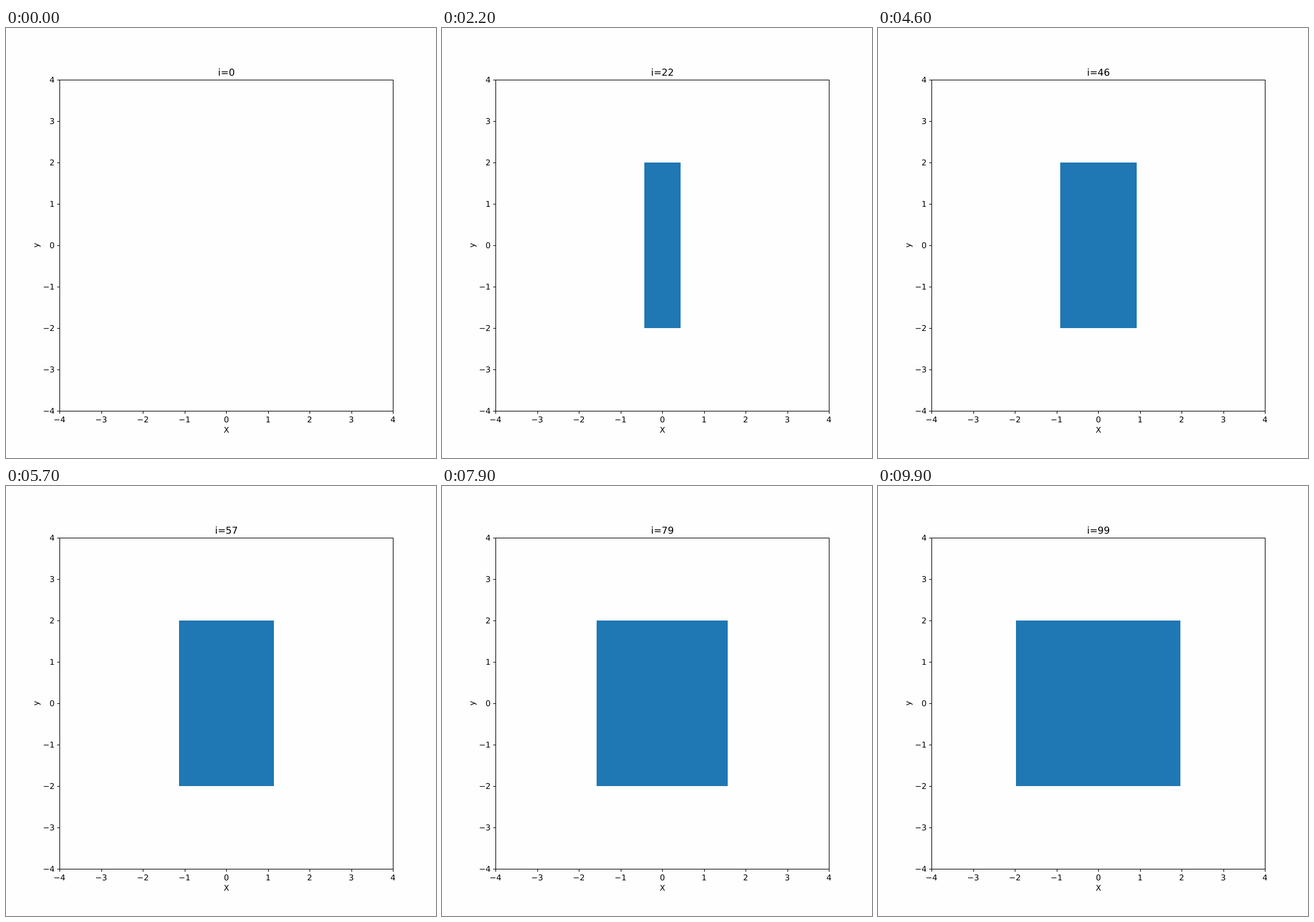
These frames come from a looping animation (748x748 px, 10 s). An HTML page:

```html
<!DOCTYPE html>
<html lang="en">
<head>
<meta charset="utf-8">
<title>Growing rectangle</title>
<style>
  html, body { margin: 0; width: 100%; height: 100%; overflow: hidden; background: #fefefe; }
  svg { display: block; width: 748px; height: 748px; }
  text { font: 13.889px "DejaVu Sans", sans-serif; text-anchor: middle; text-rendering: geometricPrecision; }
  #title { font-size: 16.667px; }
  .end { text-anchor: end; }
  .line { fill: none; stroke: #000; stroke-width: 1.11; }
</style>
</head>
<body>
<svg id="plot" viewBox="0 0 748 748">
  <rect id="bar" y="234" height="288" fill="#1f77b4"/>
  <rect class="line" x="93.5" y="90.5" width="580" height="576"/>
  <text id="title" x="383.4" y="83"></text>
  <text x="383.6" y="704">X</text>
  <text transform="translate(57 378) rotate(-90)">y</text>
</svg>
<script>
const FRAME_MS = 100;
const FRAME_COUNT = 100;
const plot = document.getElementById('plot');
const bar = document.getElementById('bar');
const title = document.getElementById('title');

function add(name, attrs, text = '') {
  const node = document.createElementNS('http://www.w3.org/2000/svg', name);
  for (const key in attrs) node.setAttribute(key, attrs[key]);
  node.textContent = text;
  plot.appendChild(node);
}

// Axis lines sit on pixel centres.
const snap = v => Math.floor(v + 0.49) + 0.5;

function drawTicks() {
  for (let n = -4; n <= 4; n++) {
    const x = 383.35 + n * 72.4625;
    const y = 377.74 - n * 71.995;
    const label = n < 0 ? '\u2212' + -n : String(n);
    add('path', { class: 'line', d: `M${snap(x)} 667V671M93 ${snap(y)}H89` });
    add('text', { x: n < 0 ? x - 0.4 : x, y: 686 }, label);
    add('text', { class: 'end', x: 84.6, y: Math.round(y + 5) }, label);
  }
}

function render(ms) {
  const i = Math.floor(ms / FRAME_MS) % FRAME_COUNT;
  const left = Math.round(383.4 - 1.4492 * i);
  const right = Math.round(383.26 + 1.446 * i);
  bar.setAttribute('x', left);
  bar.setAttribute('width', right - left);
  title.textContent = 'i=' + i;
}

drawTicks();
const start = performance.now();
function tick() {
  render(performance.now() - start);
  requestAnimationFrame(tick);
}
tick();
</script>
</body>
</html>
```
